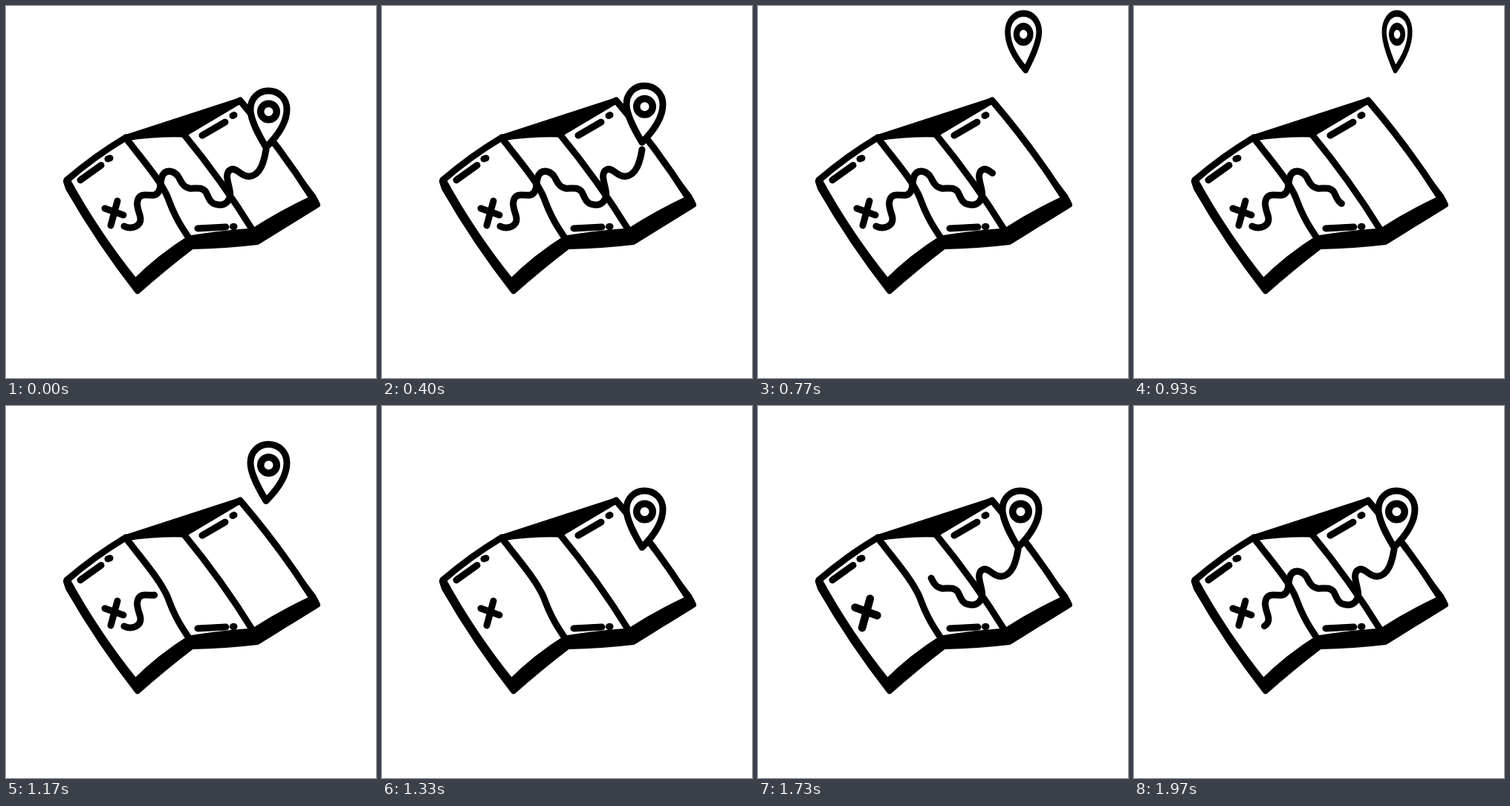
Write an HTML page that moves like this. It is 498 by 500 pixels and loops after 2010 ms.

```html
<!DOCTYPE html>
<html lang="en">
<head>
<meta charset="utf-8">
<title>Treasure map</title>
<style>
  html, body { margin: 0; width: 100%; height: 100%; overflow: hidden; background: #fff; }
  svg { display: block; width: 100%; height: 100%; }
</style>
</head>
<body>
<svg viewBox="0 0 498 500" fill="none" stroke="#000" stroke-width="9" stroke-linecap="round" stroke-linejoin="round">
  <!-- Shadow, then the folded sheet -->
  <path fill="#000" stroke-width="8" d="M81 236L84 245Q126 318 177 383Q212 352 250 323Q296 322 338 317L419 267L414 257L315 127L161 177Z"/>
  <path fill="#fff" d="M82 234Q119 202 161 177Q200 171 239 172L315 127Q369 190 413 259Q372 278 333 303Q290 306 247 313Q207 338 174 371Q122 307 82 234Z"/>
  <path d="M161 177C183 206 208 234 218 258C227 283 236 297 247 313M239 172Q291 235 333 303"/>
  <path d="M100 234L128 214M137 205.500L140 204.500M264 174L295 156M305 147.500L307 146.500M258 299L296 297M305.500 296.500L307 296.500"/>

  <path id="cross" d="M133 272L158 281M150 262L141 295"/>
  <path id="route" pathLength="1" d="M159 296C169 301 182 296 181 285C180 278 175 270 177 262C180 249 193 256 200 254C211 250 206 235 211 227C216 219 226 222 231 228C236 235 237 243 247 245C254 246 263 242 269 250C273 257 274 266 285 267C296 269 304 260 301 247C299 237 294 225 302 220C311 216 316 230 328 229C342 227 347 211 350 193"/>

  <g id="pin">
    <path fill="#fff" d="M350 190C343 178 329 155 329 139C329 124 340 114 353 114C367 114 378 124 378 139C378 158 362 178 350 190Z"/>
    <circle cx="353.500" cy="142" r="10.800" stroke-width="9.500" fill="#fff"/>
  </g>
</svg>
<script>
const LOOP = 2010;
const [cross, route, pin] = ["cross", "route", "pin"].map(id => document.getElementById(id));

const progress = (t, from, to) => Math.min(1, Math.max(0, (t - from) / (to - from)));
const ease = p => p * p * (3 - 2 * p);

function drawRoute(t) {
  const redrawing = t >= 1330;
  const shown = redrawing ? progress(t, 1330, 2005) : 1 - progress(t, 655, 1330);
  const start = redrawing ? 1 - shown : 0;
  route.setAttribute("visibility", shown > 0.002 ? "visible" : "hidden");
  route.setAttribute("stroke-dasharray", `${shown} 2`);
  route.setAttribute("stroke-dashoffset", -start);
}

function drawPin(t) {
  const lift = 104 * (ease(progress(t, 370, 570)) - ease(progress(t, 1050, 1330)));
  const turn = Math.cos(2 * Math.PI * ease(progress(t, 370, 1090)));
  pin.setAttribute("transform", `translate(355.5 ${-lift}) scale(${turn} 1) translate(-355.5 0)`);
}

function drawCross(t) {
  const scale = 1 + 0.21 * Math.sin(Math.PI * progress(t, 1430, 1930)) ** 2;
  cross.setAttribute("transform", `translate(145.5 278.5) scale(${scale}) translate(-145.5 -278.5)`);
}

const startTime = performance.now();
function frame() {
  const t = (performance.now() - startTime) % LOOP;
  drawRoute(t);
  drawPin(t);
  drawCross(t);
  requestAnimationFrame(frame);
}
frame();
</script>
</body>
</html>
```
